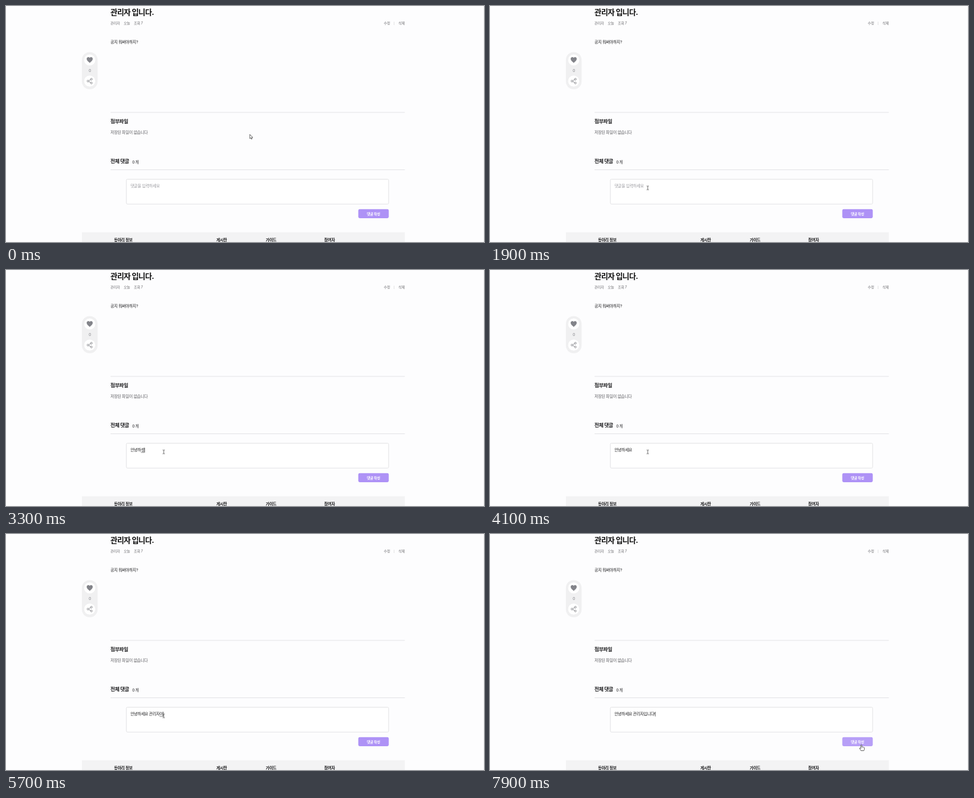
Recreate the animation shown at these times as an HTML page. Size 800 px wide and 397 px high, loop 8 s.

```html
<!DOCTYPE html>
<html lang="ko">
<head>
<meta charset="utf-8">
<title>댓글 작성</title>
<style>
  html, body { margin: 0; width: 100%; height: 100%; overflow: hidden; background: #fdfdfe; }
  svg { display: block; width: 800px; height: 397px; }
  text {
    font-family: Inter, "Noto Sans CJK KR", "Noto Sans CJK", sans-serif;
    font-size: 6.8px; letter-spacing: -.05em; white-space: pre; fill: #1c1c1e;
  }
  .title { font-size: 12.75px; font-weight: 700; fill: #111; }
  .meta { font-size: 5.95px; fill: #6c6c70; }
  .head { font-size: 8.5px; font-weight: 700; }
  .count { font-size: 6.375px; }
  .soft { fill: #5c5c60; }
  .hint { fill: #9b9ba0; }
  .foot { font-weight: 700; }
  .button { font-size: 5.95px; font-weight: 600; fill: #fff; }
  .rule { stroke: #dcdcdf; stroke-width: .8; }
  .cursor { fill: #fff; stroke: #333; stroke-width: .75; stroke-linejoin: round; }
</style>
</head>
<body>
<svg viewBox="0 0 800 397">
  <rect width="800" height="397" fill="#fdfdfe"/>
  <path d="M799.5 0V397" stroke="#f4f4f6"/>

  <text class="title" x="174.8" y="15.3">관리자 입니다.</text>
  <text class="meta" x="174.8" y="31.2">관리자</text>
  <text class="meta" x="197" y="31.2">오늘</text>
  <text class="meta" x="214" y="31.2">조회 7</text>
  <text class="meta" x="632.3" y="31.2">수정</text>
  <path class="rule" d="M649.5 26.5V32"/>
  <text class="meta" x="656.8" y="31.2">삭제</text>
  <text x="174.8" y="62.5">공지 뭐써야하지?</text>

  <rect x="127" y="77.5" width="26.3" height="62.5" rx="13.1" fill="#f0f0f1"/>
  <g fill="#fff" stroke="#e6e6e8" stroke-width=".5">
    <circle cx="140.1" cy="90.8" r="9.8"/>
    <circle cx="140.1" cy="126.3" r="9.8"/>
  </g>
  <path d="M140.1 95.8C136.9 93 135 91.4 135 89.1C135 87.3 136.3 86.1 137.8 86.1C138.7 86.1 139.6 86.5 140.1 87.3C140.6 86.5 141.5 86.1 142.4 86.1C143.9 86.1 145.2 87.3 145.2 89.1C145.2 91.4 143.3 93 140.1 95.8Z" fill="#83848a"/>
  <text x="140.2" y="110.8" text-anchor="middle" style="fill:#8a8b90">0</text>
  <g fill="#fff" stroke="#77787d" stroke-width=".8">
    <path d="M142.9 123.1L137.2 126.3L142.9 129.5" fill="none"/>
    <circle cx="142.9" cy="123.1" r="1.5"/>
    <circle cx="137.2" cy="126.3" r="1.5"/>
    <circle cx="142.9" cy="129.5" r="1.5"/>
  </g>

  <path class="rule" d="M175 179H667.5M175 275.5H667.5"/>
  <text class="head" x="174.8" y="196.6">첨부파일</text>
  <text class="soft" x="174.8" y="215">저장된 파일이 없습니다</text>
  <text class="head" x="174.8" y="264.1">전체 댓글</text>
  <text class="count" x="211.2" y="265">0 개</text>

  <rect x="201.4" y="291.4" width="439" height="41.8" rx="2" fill="#fff" stroke="#dcdcdf" stroke-width=".8"/>
  <text id="hint" class="hint" x="208.2" y="305.3">댓글을 입력하세요</text>
  <text id="entry" x="208.2" y="305.3"></text>
  <path id="underline" stroke="#333" stroke-width=".6"/>
  <path id="caret" stroke="#222" stroke-width=".6"/>

  <rect id="button" x="589.6" y="341.8" width="51" height="15.2" rx="2.4"/>
  <text class="button" x="615" y="351.5" text-anchor="middle">댓글 작성</text>

  <rect x="127" y="380.6" width="540.5" height="17" fill="#f3f3f4"/>
  <text class="foot" x="180.8" y="396.2">동아리 정보</text>
  <text class="foot" x="352" y="396.2">게시판</text>
  <text class="foot" x="434.8" y="396.2">가이드</text>
  <text class="foot" x="532.6" y="396.2">참여자</text>

  <g id="cursor">
    <path id="arrow" class="cursor" d="M0 0V7.1L1.6 5.7L2.6 8L3.9 7.4L2.9 5.2H5Z"/>
    <path id="beam" d="M-1.8 -3.2Q-.3 -3.2 0 -2.5Q.3 -3.2 1.8 -3.2M0 -2.6V2.6M-1.8 3.2Q-.3 3.2 0 2.5Q.3 3.2 1.8 3.2" fill="none" stroke="#444" stroke-width=".8"/>
    <path id="hand" class="cursor" d="M-.8 .4Q0 -.6 .8 .4V3.8Q1.6 3.1 2.3 4Q3.1 3.4 3.7 4.3Q4.8 3.9 5 5V7.2Q5 8.5 4.2 9.9H-.6Q-1.3 8.2 -3 6.5Q-3.4 5.2 -2.1 5.3L-.8 6.4Z"/>
  </g>
</svg>
<script>
  const LOOP = 8000, STEP = 100, CLICK = 2000, BLINK = 500;
  const $ = id => document.getElementById(id);

  // [time, text]; a trailing "_" marks a syllable still being composed
  const typing = [
    [2200, 'ㅇ_'], [2300, '아_'], [2400, '안_'], [2500, '안ㄴ_'], [2600, '안녀_'],
    [2700, '안녕_'], [2800, '안녕ㅎ_'], [2900, '안녕하_'], [3000, '안녕핫_'],
    [3100, '안녕하세_'], [3300, '안녕하셍_'], [3400, '안녕하세요_'], [3600, '안녕하세요 '],
    [4800, '안녕하세요 ㄱ_'], [4900, '안녕하세요 고_'], [5000, '안녕하세요 과_'],
    [5100, '안녕하세요 관_'], [5200, '안녕하세요 관ㄹ_'], [5300, '안녕하세요 관리_'],
    [5400, '안녕하세요 관맂_'], [5500, '안녕하세요 관리자_'], [5600, '안녕하세요 관리장_'],
    [5700, '안녕하세요 관리자이_'], [5800, '안녕하세요 관리자입_'], [5900, '안녕하세요 관리자입ㄴ_'],
    [6100, '안녕하세요 관리자입니_'], [6200, '안녕하세요 관리자입닏_'],
    [6300, '안녕하세요 관리자입니다_'], [6600, '안녕하세요 관리자입니다!']
  ];

  // [time, x, y]
  const route = [
    [0, 408, 216], [400, 408, 216], [700, 374, 238], [1000, 310, 278], [1300, 268, 304],
    [1400, 264, 306], [6900, 264, 306], [7000, 274, 307], [7200, 366, 319], [7400, 492, 335],
    [7500, 558, 345], [7600, 614, 352], [7700, 645.5, 356], [7800, 633, 355.5], [7900, 621.5, 354.6]
  ];

  function pointAt(t) {
    const i = route.findIndex(p => p[0] > t);
    if (i < 0) return route.at(-1).slice(1);
    const [t0, x0, y0] = route[i - 1], [t1, x1, y1] = route[i];
    const k = (t - t0) / (t1 - t0);
    return [x0 + (x1 - x0) * k, y0 + (y1 - y0) * k];
  }

  const show = (id, on) => $(id).style.display = on ? '' : 'none';

  function drawEntry(t) {
    const [since, raw] = typing.findLast(s => s[0] <= t) || [CLICK, ''];
    const text = raw.replace('_', ''), composing = raw !== text;
    const entry = $('entry'), left = 208.2;
    entry.textContent = text;
    const end = left + (text ? entry.getComputedTextLength() : 0);
    show('hint', !text);
    show('underline', composing);
    if (composing) {
      const from = text.length > 1 ? left + entry.getSubStringLength(0, text.length - 1) : left;
      $('underline').setAttribute('d', `M${from} 306.9H${end}`);
    }
    show('caret', t >= CLICK && Math.floor((t - since) / BLINK) % 2 === 0);
    $('caret').setAttribute('d', `M${end + .2} 299V307`);
  }

  function drawCursor(t) {
    const [x, y] = pointAt(t);
    const hover = x > 589 && x < 641 && y > 341 && y < 357;
    const inField = x > 201 && x < 641 && y > 291 && y < 336;
    $('cursor').setAttribute('transform', `translate(${x} ${y})`);
    show('hand', hover);
    show('beam', inField);
    show('arrow', !hover && !inField);
    $('button').setAttribute('fill', hover ? '#b79ff7' : '#ae92f6');
  }

  const start = performance.now();
  let last = -1;
  function tick() {
    const t = Math.floor((performance.now() - start) % LOOP / STEP) * STEP;
    if (t !== last) {
      drawEntry(t);
      drawCursor(t);
      last = t;
    }
    requestAnimationFrame(tick);
  }
  tick();
</script>
</body>
</html>
```
